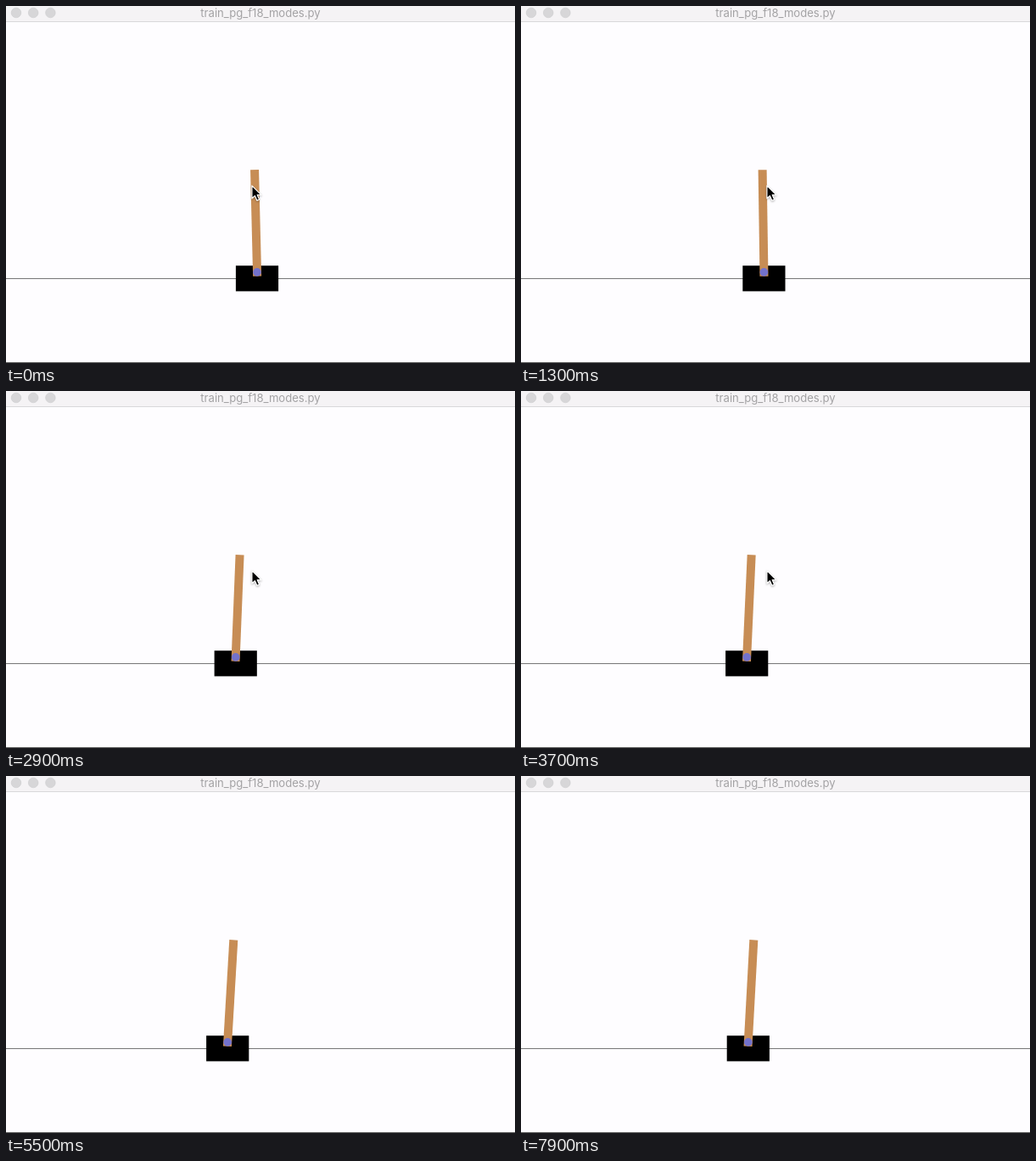
Write an HTML page that moves like this. It is 600 by 421 pixels and loops after 8 s.

```html
<!DOCTYPE html>
<html lang="en">
<head>
<meta charset="utf-8">
<title>Cart and pole</title>
<style>
  html, body { margin: 0; width: 100%; height: 100%; overflow: hidden; background: #fefdff; }
  svg { display: block; width: 600px; height: 421px; }
  text { font: 13.1px Inter, "Liberation Sans", sans-serif; fill: #a3a2a4; text-anchor: middle; }
  #cursor { filter: drop-shadow(0 1px 1px rgba(0, 0, 0, .3)); }
</style>
</head>
<body>
<svg viewBox="0 0 600 421">
  <rect width="600" height="421" fill="#fefdff"/>
  <rect width="600" height="18" fill="#f5f3f5"/>
  <rect y="18" width="600" height="1" fill="#d9d8da"/>
  <g fill="#d7d6d8" stroke="#cccbcd" stroke-width=".6">
    <circle cx="12" cy="8" r="5.8"/>
    <circle cx="32.2" cy="8" r="5.8"/>
    <circle cx="52.4" cy="8" r="5.8"/>
  </g>
  <text x="300" y="13">train_pg_f18_modes.py</text>
  <rect y="420" width="600" height="1" fill="#5c5c5c"/>
  <rect y="321" width="600" height="1" fill="#777"/>
  <g id="cart">
    <rect x="-25.1" y="306.2" width="50.2" height="30.2" fill="#000"/>
    <g transform="translate(0 313.9)">
      <rect id="pole" x="-5" y="-120.7" width="10" height="125.5" fill="#c78d55"/>
      <circle r="4.8" fill="#7372cc"/>
    </g>
  </g>
  <path id="cursor" d="M0 0V15.2L3.5 12L6 17.6L8.7 16.4L6.3 11H11Z"
        fill="#000" stroke="#fff" stroke-width="1.2" stroke-linejoin="round"/>
</svg>
<script>
  const LOOP = 8000, STEP = 100;
  const LEAVE = 4700, GONE = 5200;

  const poses = [
    { t: 0, x: 296, angle: -1.4 },
    { t: 1300, x: 286.4, angle: -0.85 },
    { t: 2200, x: 275.8, angle: 1.65 },
    { t: 3700, x: 266.2, angle: 2.6 },
    { t: 4500, x: 263.7, angle: 2.45 },
    { t: 6600, x: 260.2, angle: 4.2 },
    { t: 7900, x: 267.8, angle: 3.1 }
  ];

  const [cart, pole, cursor] = ["cart", "pole", "cursor"].map(id => document.getElementById(id));

  function slope(key, i) {
    const a = poses[Math.max(i - 1, 0)], b = poses[Math.min(i + 1, poses.length - 1)];
    return (b[key] - a[key]) / (b.t - a.t);
  }

  // Cubic Hermite curve through the poses
  function poseValue(key, t) {
    const i = Math.max(poses.findIndex(pose => pose.t >= t), 1);
    const a = poses[i - 1], b = poses[i], span = b.t - a.t;
    const u = (t - a.t) / span, v = 1 - u;
    return v * v * (1 + 2 * u) * a[key] + u * u * (1 + 2 * v) * b[key]
      + span * u * v * (v * slope(key, i - 1) - u * slope(key, i));
  }

  function draw(t) {
    cart.setAttribute("transform", `translate(${poseValue("x", t)} 0)`);
    pole.setAttribute("transform", `rotate(${poseValue("angle", t)})`);
    const away = Math.min(Math.max((t - LEAVE) / (GONE - STEP - LEAVE), 0), 1);
    cursor.setAttribute("transform", `translate(${289.9 + 67 * away} ${211.8 - 162 * away})`);
    cursor.setAttribute("visibility", t < GONE ? "visible" : "hidden");
  }

  const start = performance.now();
  function tick() {
    const t = (performance.now() - start) % LOOP;
    draw(Math.floor(t / STEP) * STEP);
    requestAnimationFrame(tick);
  }
  draw(0);
  requestAnimationFrame(tick);
</script>
</body>
</html>
```
